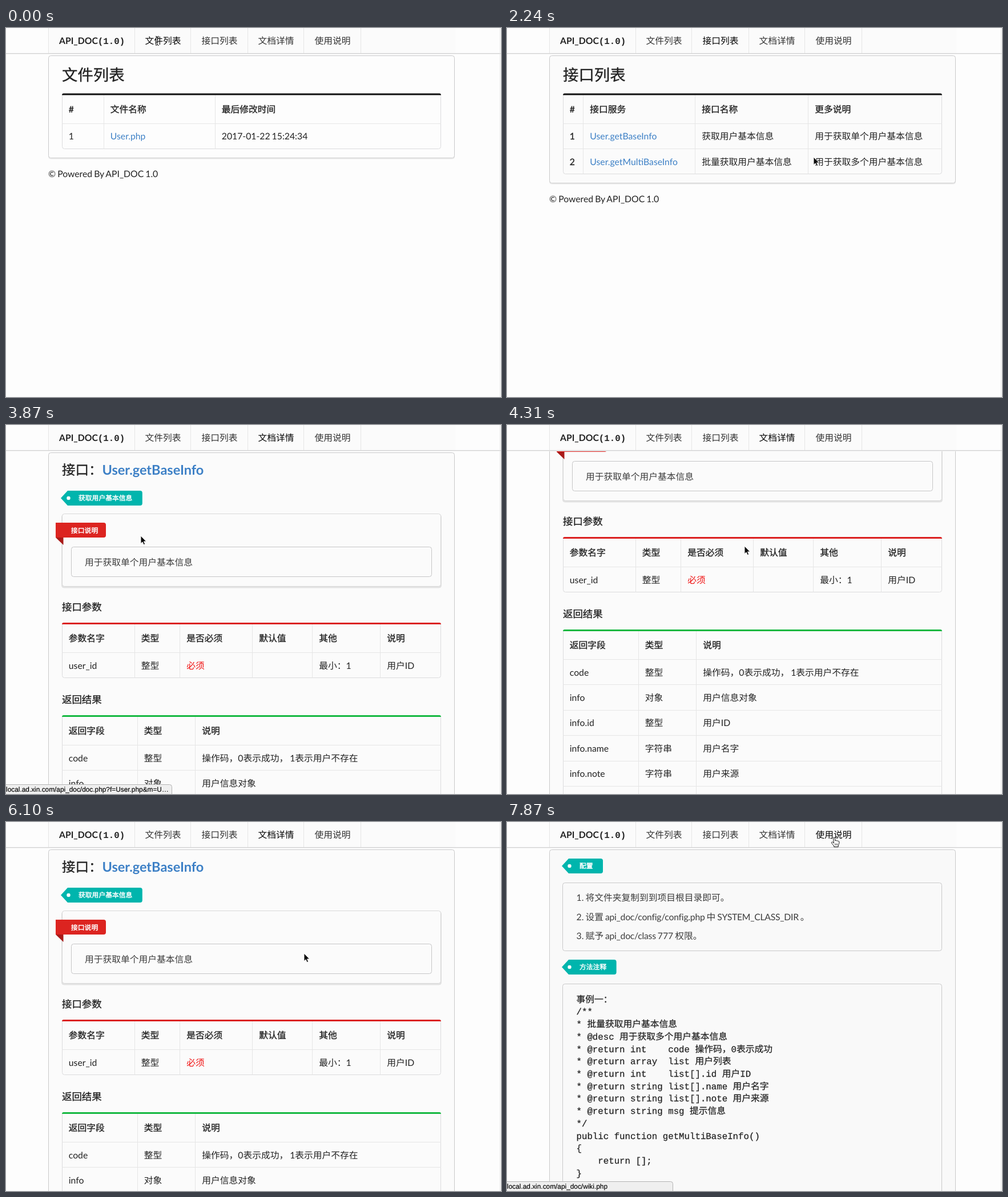
These frames come from a looping animation (867x646 px, 8000 ms). An HTML page:

```html
<!DOCTYPE html>
<html lang="zh-CN">
<head>
<meta charset="utf-8">
<title>API_DOC</title>
<style>
html, body { margin: 0; width: 100%; height: 100%; overflow: hidden; background: #fdfdfd; }
svg { display: block; width: 867px; height: 646px; }
text { font-family: Lato, "Noto Sans CJK SC", "Noto Sans CJK", sans-serif; font-size: 15.75px; word-spacing: -1px; fill: #222; white-space: pre; text-rendering: geometricPrecision; }
.head { stroke: #222; stroke-width: .35px; }
.bold { font-weight: 700; }
.link { fill: #3d80c6; }
.link.over { fill: #1a69b8; }
.must { fill: #f01010; }
.soft { fill: #3c3c3c; }
.path { letter-spacing: -.25px; }
.tab { fill: #333; }
.tab.on { fill: #050505; }
.label { fill: #fff; stroke: #fff; stroke-width: .45px; font-size: 11.8px; }
.info { fill: #1c77c3; }
.info .strong { stroke: #1c77c3; stroke-width: .4px; }
.code, .mono { font-family: "Liberation Mono", "Noto Sans CJK SC", "Noto Sans CJK", monospace; word-spacing: 0; }
.code { stroke: #222; stroke-width: .25px; }
.status { font-family: "Liberation Sans", sans-serif; font-size: 11.87px; fill: #000; stroke: #000; stroke-width: .15px; }
</style>
</head>
<body>
<svg id="stage" viewBox="0 0 867 646"></svg>
<script>
const LOOP = 8000, TICK = 148.7;

// ---- drawing helpers ----
const text = (x, mid, s, cls = '', size = 15.75) =>
  `<text x="${x}" y="${mid + size * .36}" class="${cls}" style="font-size:${size}px">${s}</text>`;
const rect = (x, y, w, h, fill, stroke = 'none', r = 0) =>
  `<rect x="${x}" y="${y}" width="${w}" height="${h}" rx="${r}" fill="${fill}" stroke="${stroke}"/>`;
const line = (x1, y1, x2, y2, c = '#e6e6e6') =>
  `<path d="M${x1} ${y1}L${x2} ${y2}" stroke="${c}" fill="none"/>`;
const px = v => Math.floor(v) + .5;

function panel(bottom, fill) {
  return rect(74.5, 50.5, 711, bottom - 49, fill, '#e2e2e2', 4) +
    rect(74.5, 48.5, 711, bottom - 48.5, fill, '#c9c9ca', 4);
}

function table(top, color, cols, head, rows) {
  const y0 = top + 52.5, rowH = 44.4, end = px(y0 + rowH * rows.length);
  const xs = [98, ...cols];
  let out = rect(98.5, top + 1, 663, end - top - 1, 'none', '#dcdcdd', 4);
  cols.forEach(x => out += line(px(x), top + 3, px(x), end));
  rows.forEach((_, i) => out += line(98.5, px(y0 + rowH * i), 762, px(y0 + rowH * i)));
  out += `<path d="M98 ${top + 3}Q98 ${top} 101 ${top}H759Q762 ${top} 762 ${top + 3}Z" fill="${color}"/>`;
  head.forEach((s, i) => out += text(xs[i] + 11.8, top + 27.5, s, s === '#' ? 'bold' : 'head'));
  rows.forEach((row, r) => row.forEach((cell, i) => {
    const [s, cls] = [].concat(cell);
    out += text(xs[i] + 11.8, y0 + 22.5 + rowH * r, s, cls);
  }));
  return out;
}

function tag(mid, s) {
  const right = 144.4 + s.length * 11.8;
  return `<path d="M96 ${mid}L108 ${mid - 13}H${right - 4}q4 0 4 4v18q0 4-4 4H108Z" fill="#00b5ad"/>
    <circle cx="109.5" cy="${mid}" r="3.2" fill="#fff"/>` + text(127, mid, s, 'label', 11.8);
}

const footer = y => text(74, y, '© Powered By API_DOC 1.0');
const box = (y, h) => rect(97.5, y, 664, h, 'none', '#c9c9ca', 4);

// ---- pages ----
const TINT = '#fbfbfb';

const files = () => panel(227.5, '#fdfdfd') +
  text(98, 82, '文件列表', 'head', 27.4) +
  table(114.5, '#111', [171, 366], ['#', '文件名称', '最后修改时间'],
    [['1', ['User.php', 'link'], '2017-01-22 15:24:34']]) + footer(255);

const methods = () => panel(271.5, TINT) +
  text(98, 82, '接口列表', 'head', 27.4) +
  table(114.5, '#111', [133.5, 329.5, 527.5], ['#', '接口服务', '接口名称', '更多说明'], [
    [['1', 'head'], ['User.getBaseInfo', 'link'], '获取用户基本信息', '用于获取单个用户基本信息'],
    [['2', 'head'], ['User.getMultiBaseInfo', 'link'], '批量获取用户基本信息', '用于获取多个用户基本信息']
  ]) + footer(299);

const doc = () => panel(912.5, TINT) +
  text(98, 79, '接口：', 'head', 23.5) +
  text(168.5, 79, 'User.getBaseInfo', 'link bold', 23.5) +
  tag(128, '获取用户基本信息') +
  rect(97.5, 157, 665, 128, '#e2e2e2', '#e2e2e2', 4) +
  rect(98.5, 155.5, 663, 127, TINT, '#d8d8d8', 4) +
  '<path d="M87 171H171q4 0 4 4V193q0 4-4 4H87Z" fill="#dc2420"/>' +
  '<path d="M87 197H100.5V210Z" fill="#a91a18"/>' +
  text(114, 184.5, '接口说明', 'label', 11.8) +
  rect(114.5, 213.5, 631, 52, 'none', '#c6c6c7', 4) +
  text(138, 240, '用于获取单个用户基本信息', 'soft') +
  text(98, 319, '接口参数', 'head', 17.4) +
  table(346, '#db2020', [225, 304.5, 431.5, 536.5, 655.5],
    ['参数名字', '类型', '是否必须', '默认值', '其他', '说明'],
    [['user_id', '整型', ['必须', 'must'], '', '最小：1', '用户ID']]) +
  text(98, 481, '返回结果', 'head', 17.4) +
  table(508, '#16b841', [230, 331.5], ['返回字段', '类型', '说明'], [
    ['code', '整型', '操作码，0表示成功， 1表示用户不存在'],
    ['info', '对象', '用户信息对象'],
    ['info.id', '整型', '用户ID'],
    ['info.name', '字符串', '用户名字'],
    ['info.note', '字符串', '用户来源'],
    ['msg', '字符串', '提示信息']
  ]) +
  rect(97.5, 844.5, 664, 52, '#dbf0ff', '#a5c3d6', 4) +
  text(121.5, 870.5, '<tspan class="strong">温馨提示：</tspan> 此接口参数列表根据后台代码自动生成。', 'info') +
  footer(940);

const path = s => `<tspan class="path">${s}</tspan>`;

const CODE = `事例一：
/**
* 批量获取用户基本信息
* @desc 用于获取多个用户基本信息
* @return int    code 操作码，0表示成功
* @return array  list 用户列表
* @return int    list[].id 用户ID
* @return string list[].name 用户名字
* @return string list[].note 用户来源
* @return string msg 提示信息
*/
public function getMultiBaseInfo()
{
    return [];
}`.split('\n');

const wiki = () => panel(720, '#f9f9f9') + tag(77, '配置') + box(106.5, 119) +
  ['将文件夹复制到到项目根目录即可。',
   `设置 ${path('api_doc/config/config.php')} 中 ${path('SYSTEM_CLASS_DIR')} 。`,
   `赋予 ${path('api_doc/class')} 777 权限。`]
    .map((s, i) => text(121.5, 132.3 + 33.7 * i, `${i + 1}. ${s}`, 'soft')).join('') +
  tag(254, '方法注释') + box(283.5, 420) +
  CODE.map((s, i) => text(121.5, 310 + 21.72 * i, s, 'code')).join('');

const TABS = [[243.5, '文件列表'], [342.5, '接口列表'], [441.5, '文档详情'], [540.5, '使用说明']];

const nav = () => rect(0, 0, 867, 44, '#fdfdfd') +
  rect(75, 0, 712, 44, '#fbfbfb') +
  rect(0, 44, 867, 1, '#d2d2d3') + rect(0, 45, 867, 1, '#ececec') +
  [74, 225, 323, 423, 521, 621].map(x => line(x + .5, 0, x + .5, 44)).join('') +
  text(93, 22, 'API_DOC<tspan class="mono">(1.0)</tspan>', 'bold') +
  TABS.map(([x, s]) => text(x, 22, s, 'tab')).join('');

const CURSORS = {
  beam: '<path d="M-3-7.5Q0-7.5 0-5.5V6.5Q0 8.5-3 8.5M3-7.5Q0-7.5 0-5.5M0 6.5Q0 8.5 3 8.5M-2 3H2" fill="none" stroke="#222"/>',
  arrow: '<path d="M0 0V13.6L3.1 10.8L5.2 15.6L7.6 14.6L5.5 9.9H9.7Z" fill="#0a0a0a" stroke="#fff" stroke-width=".9"/>',
  hand: '<path d="M-1.6 1.2C-1.6-.6 1-.6 1.2 1.2L1.9 6C2.3 4.8 4 4.9 4.3 6.2C4.9 5.2 6.4 5.5 6.7 6.7C7.5 6 8.9 6.4 8.9 7.9C8.9 11 7.8 12.5 7.2 14V16.5H-.3V15C-1.5 13.2-3.3 11.6-4.6 9.6C-5.1 8.2-3.4 7.4-2.5 8.3L-.6 10Z" fill="#fff" stroke="#111"/>' +
    '<path d="M1.6 10.5V14M3.6 10.5V14M5.6 10.5V14" stroke="#333" stroke-width=".8"/>'
};

// ---- scene ----
const stage = document.getElementById('stage');
const pages = [files, methods, doc, wiki];
stage.innerHTML = rect(0, 0, 867, 646, '#fdfdfd') +
  pages.map(p => `<g class="page">${p()}</g>`).join('') + nav() + line(865.5, 0, 865.5, 646, '#e3e3e3') +
  `<g id="bar"><path d="M-1 629.5H286.5q4 0 4 4V647H-1Z" fill="#efefef" stroke="#b4b4b4"/>
   <text id="url" class="status" x="0" y="642"></text></g>` +
  Object.keys(CURSORS).map(k => `<g class="cursor" data-kind="${k}">${CURSORS[k]}</g>`).join('');

const all = s => [...stage.querySelectorAll(s)];
const pageEls = all('.page'), tabEls = all('.tab'), cursorEls = all('.cursor');
const bar = stage.querySelector('#bar'), url = stage.querySelector('#url');
const fileLink = pageEls[0].querySelector('.link'), methodLink = pageEls[1].querySelector('.link');
const show = (el, on) => el.style.display = on ? '' : 'none';

// ---- timeline, counted in ticks ----
const PATH = [
  [0, 265, 22, 'beam'], [2, 252, 75, 'arrow'], [5, 222, 188, 'hand'], [6, 220, 194, 'hand'],
  [8, 220, 194, 'hand'], [9, 221, 195, 'hand'], [10, 250, 200, 'arrow'], [14, 538, 214, 'arrow'],
  [15, 537, 226, 'arrow'], [19, 310, 212, 'arrow'], [21, 238, 194, 'hand'], [22, 221, 190, 'hand'],
  [25, 221, 190, 'hand'], [26, 236, 194, 'arrow'], [29, 416, 212, 'arrow'], [31, 416, 212, 'arrow'],
  [32, 415, 212, 'arrow'], [35, 415, 212, 'arrow'], [36, 522, 230, 'arrow'], [43, 522, 230, 'arrow'],
  [44, 552, 96, 'arrow'], [45, 580, 0, 'arrow'], [46, 580, 0, 'arrow'], [47, 582, 12, 'hand'],
  [49, 573, 27, 'hand'], [60, 573, 27, 'hand']
];
const PAGES = [[0, 0], [8, 1], [25, 2], [53, 3]];
const SCROLL = [[0, 0], [28, 30], [29, 150], [30, 319], [41, 0]];
const SITE = 'local.ad.xin.com/api_doc/';
const LIST = SITE + 'list_method.php?f=User.php', DOC = SITE + 'doc.php?f=User.php&m=U…';
const STATUS = [[0, ''], [5, LIST], [9, DOC], [12, ''], [21, DOC], [27, ''], [47, SITE + 'wiki.php']];

const at = (keys, n) => keys.filter(k => k[0] <= n).pop()[1];

function cursorAt(n) {
  const i = PATH.findIndex((k, j) => PATH[j + 1][0] > n);
  const [a, x, y, kind] = PATH[i], [b, x2, y2] = PATH[i + 1];
  const u = (n - a) / (b - a);
  return [x + (x2 - x) * u, y + (y2 - y) * u, kind];
}

function draw(t) {
  const n = Math.floor((t + 12) / TICK);
  const page = at(PAGES, n), [x, y, kind] = cursorAt(n), status = at(STATUS, n);
  pageEls.forEach((el, i) => show(el, i === page));
  pageEls[2].setAttribute('transform', `translate(0 ${-at(SCROLL, n)})`);
  tabEls.forEach((el, i) => el.classList.toggle('on', i === page || (i === 3 && n >= 47)));
  fileLink.classList.toggle('over', kind === 'hand');
  methodLink.classList.toggle('over', kind === 'hand' && n > 8);
  show(bar, status);
  url.textContent = status;
  cursorEls.forEach(el => {
    show(el, el.dataset.kind === kind);
    el.setAttribute('transform', `translate(${Math.round(x)} ${Math.round(y)})`);
  });
}

const start = performance.now();
function loop(now) {
  draw(Math.max(0, now - start) % LOOP);
  requestAnimationFrame(loop);
}
draw(0);
requestAnimationFrame(loop);
</script>
</body>
</html>
```
